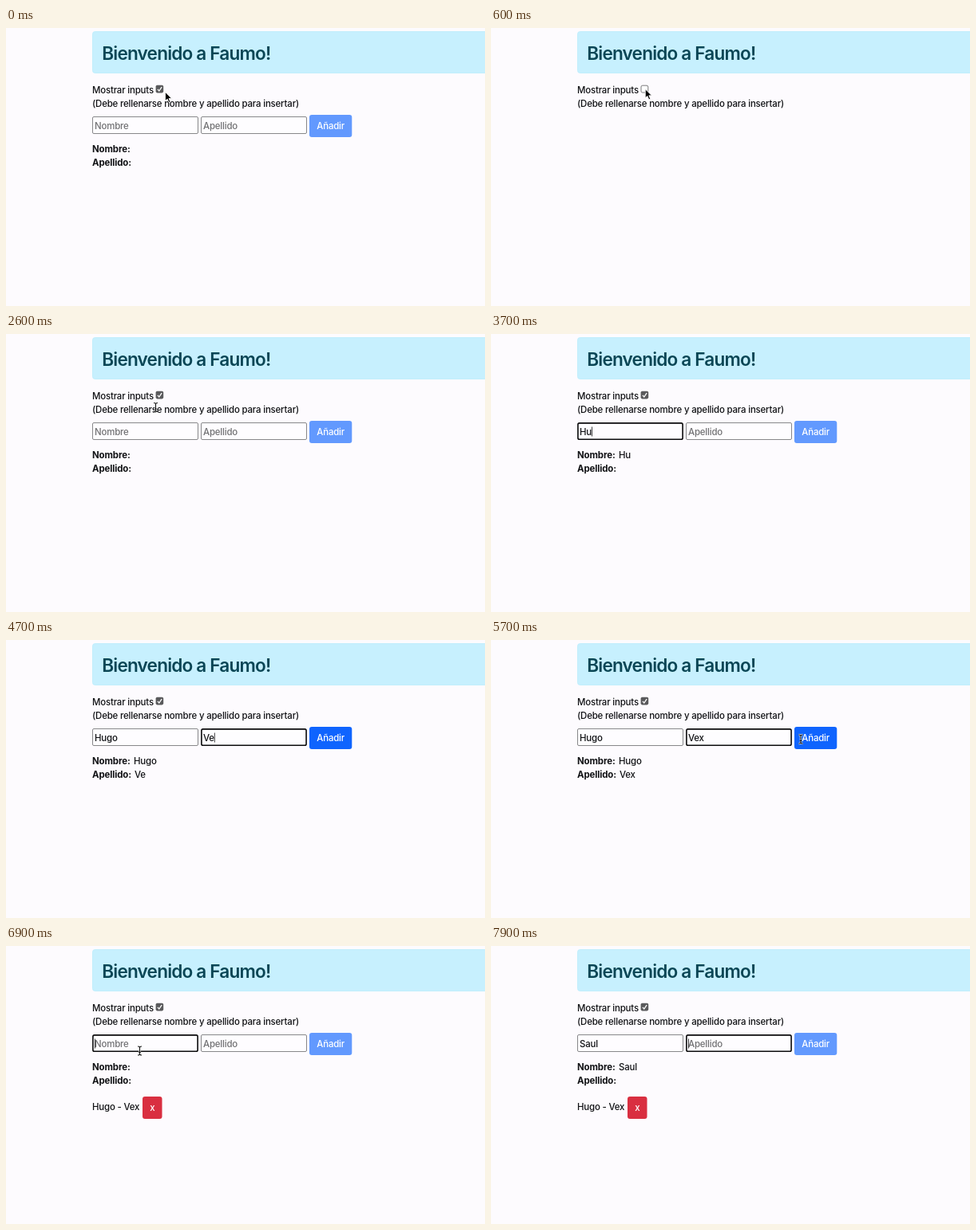
An HTML page that plays this animation: 600 by 349 pixels, repeating every 8 s.

```html
<!DOCTYPE html>
<html lang="es">
<head>
<meta charset="utf-8">
<title>Bienvenido a Faumo!</title>
<style>
  html, body { margin: 0; width: 100%; height: 100%; overflow: hidden; background: #fdfbfe; }
  svg { display: block; width: 600px; height: 349px; }
  text {
    font: 450 11.45px Inter, Roboto, sans-serif;
    font-optical-sizing: none;
    letter-spacing: -.18px;
    fill: #111215;
  }
  .title { font-size: 22.6px; font-weight: 600; letter-spacing: -.83px; fill: #0a4655; }
  .bold { font-weight: 700; letter-spacing: -.1px; }
  .hint { fill: #717173; }
  .light { fill: #fff; }
</style>
</head>
<body>
<svg id="stage" viewBox="0 0 600 349"></svg>
<script>
const LOOP = 8000, STEP = 100;
const stage = document.getElementById('stage');

// Each list holds [start time, value]; the value stays until the next one.
const shown = [[0, true], [500, false], [1100, true], [1600, false], [2100, true]];
const focus = [[0, -1], [3000, 0], [4300, 1], [6100, -1], [6900, 0], [7700, 1]];
const first = [[0, ''], [3500, 'H'], [3600, 'Hu'], [3900, 'Hug'], [4000, 'Hugo'],
  [6100, ''], [7200, 'S'], [7300, 'Sa'], [7400, 'Sau'], [7500, 'Saul']];
const last = [[0, ''], [4500, 'V'], [4700, 'Ve'], [4900, 'Vex'], [6100, '']];
const pointer = [[0, 'arrow'], [2400, 'beam'], [3500, ''], [5200, 'beam'],
  [5800, 'hand'], [6100, 'arrow'], [6500, 'beam'], [7200, '']];
const path = [[0, 199.5, 80.5], [300, 193.3, 76.8], [2100, 193.3, 76.8], [2600, 187.5, 92],
  [2900, 165, 123], [5200, 165, 123], [5700, 388, 124.5], [5900, 402, 126],
  [6200, 402, 126], [6500, 167.5, 131.5], [LOOP, 167.5, 131.5]];

const entry = (list, t) => list.filter(e => e[0] <= t).pop();
const at = (list, t) => entry(list, t)[1];

function mouseAt(t) {
  const i = path.findIndex(p => p[0] > t);
  const [t0, x0, y0] = path[i - 1], [t1, x1, y1] = path[i];
  const u = (t - t0) / (t1 - t0), k = u * u * (3 - 2 * u);
  return [x0 + (x1 - x0) * k, y0 + (y1 - y0) * k];
}

const text = (x, y, s, cls = '', extra = '') =>
  `<text x="${x}" y="${y}" class="${cls}" ${extra}>${s}</text>`;
const rect = (x, y, w, h, r, fill, stroke = 'none', sw = 1) =>
  `<rect x="${x}" y="${y}" width="${w}" height="${h}" rx="${r}" fill="${fill}" stroke="${stroke}" stroke-width="${sw}"/>`;

const button = (x, y, w, fill, label, dy) => rect(x, y, w, 27.9, 3, fill) +
  text(x + w / 2, y + dy, label, 'light', 'text-anchor="middle"');

function field(x, value, hint, focused) {
  const box = focused
    ? rect(x + .9, 111.9, 131.2, 20.3, 1.8, '#fefdff', '#0b0b0c', 1.6)
    : rect(x + .5, 111.5, 132, 21, 1.5, '#fefdff', '#7b7b7d', .9);
  return box + text(x + 3, 126.8, value || hint, value ? '' : 'hint', focused ? 'id="active"' : '');
}

function checkbox(on) {
  return on
    ? rect(187.6, 71.8, 9.6, 9.6, 1.8, '#5a5a5c') +
      '<path d="M189.9 76.9l1.9 2.1 3.3-4.9" fill="none" stroke="#fff" stroke-width="1.3"/>'
    : rect(188, 72.2, 8.8, 8.8, 1.8, '#fff', '#6c6c6e', .9);
}

const cursors = {
  arrow: '<path d="M0 0V11L2.6 8.6L4.5 13L6.4 12.2L4.5 8H8Z" fill="#000" stroke="#fff" stroke-width=".8"/>',
  beam: ['#fff" stroke-width="2.6" stroke-opacity=".8', '#111" stroke-width="1.1'].map(s =>
    `<path d="M-2.5 -5.5Q0 -5.5 0 -4Q0 -5.5 2.5 -5.5M0 -4V4M-2.5 5.5Q0 5.5 0 4Q0 5.5 2.5 5.5M-1.3 2H1.3" fill="none" stroke="${s}"/>`).join(''),
  hand: '<path d="M-1 0Q0 -1 1 0V4L5 5Q6 5.3 6 6.5L5 11H-1L-4 7Q-4 5.5 -2.5 6L-1 7Z" fill="#fff" stroke="#000" stroke-width=".9"/>'
};

function caretOn(t) {
  const edit = Math.max(...[focus, first, last].map(l => entry(l, t)[0]));
  return Math.floor((t - edit) / 500) % 2 === 0;
}

function form(t) {
  const a = at(first, t), b = at(last, t), f = at(focus, t);
  return field(108, a, 'Nombre', f === 0) + field(244, b, 'Apellido', f === 1) +
    button(380, 109, 53.3, a && b ? '#0f64fe' : '#6299fe', 'Añadir', 18.2) +
    text(108, 155.8, 'Nombre:', 'bold') + text(160, 155.8, a) +
    text(108, 173.4, 'Apellido:', 'bold') + text(161, 173.4, b);
}

function draw(t) {
  const on = at(shown, t), kind = at(pointer, t);
  let s = rect(108.5, 4.5, 520, 52, 3, '#c7f0fe', '#b9ecfb', .8) +
    text(120.3, 39.5, 'Bienvenido a Faumo!', 'title') +
    text(108, 81.5, 'Mostrar inputs') + checkbox(on) +
    text(108, 99.1, '(Debe rellenarse nombre y apellido para insertar)');
  if (on) s += form(t);
  if (t >= 6100) s += text(108, 206.2, 'Hugo - Vex') + button(171, 189, 24.5, '#d92f40', 'x', 18);
  if (kind) s += `<g transform="translate(${mouseAt(t)})">${cursors[kind]}</g>`;
  stage.innerHTML = s;

  const active = document.getElementById('active');
  if (active && caretOn(t)) {
    const typed = at(at(focus, t) ? last : first, t);
    const x = +active.getAttribute('x') + (typed ? active.getComputedTextLength() : 0);
    active.insertAdjacentHTML('afterend', rect(x, 116.5, .8, 12, 0, '#111'));
  }
}

let drawn = -1;
const start = performance.now();
function tick() {
  const t = Math.floor((performance.now() - start) % LOOP / STEP) * STEP;
  if (t !== drawn) draw(drawn = t);
  requestAnimationFrame(tick);
}
tick();
</script>
</body>
</html>
```
